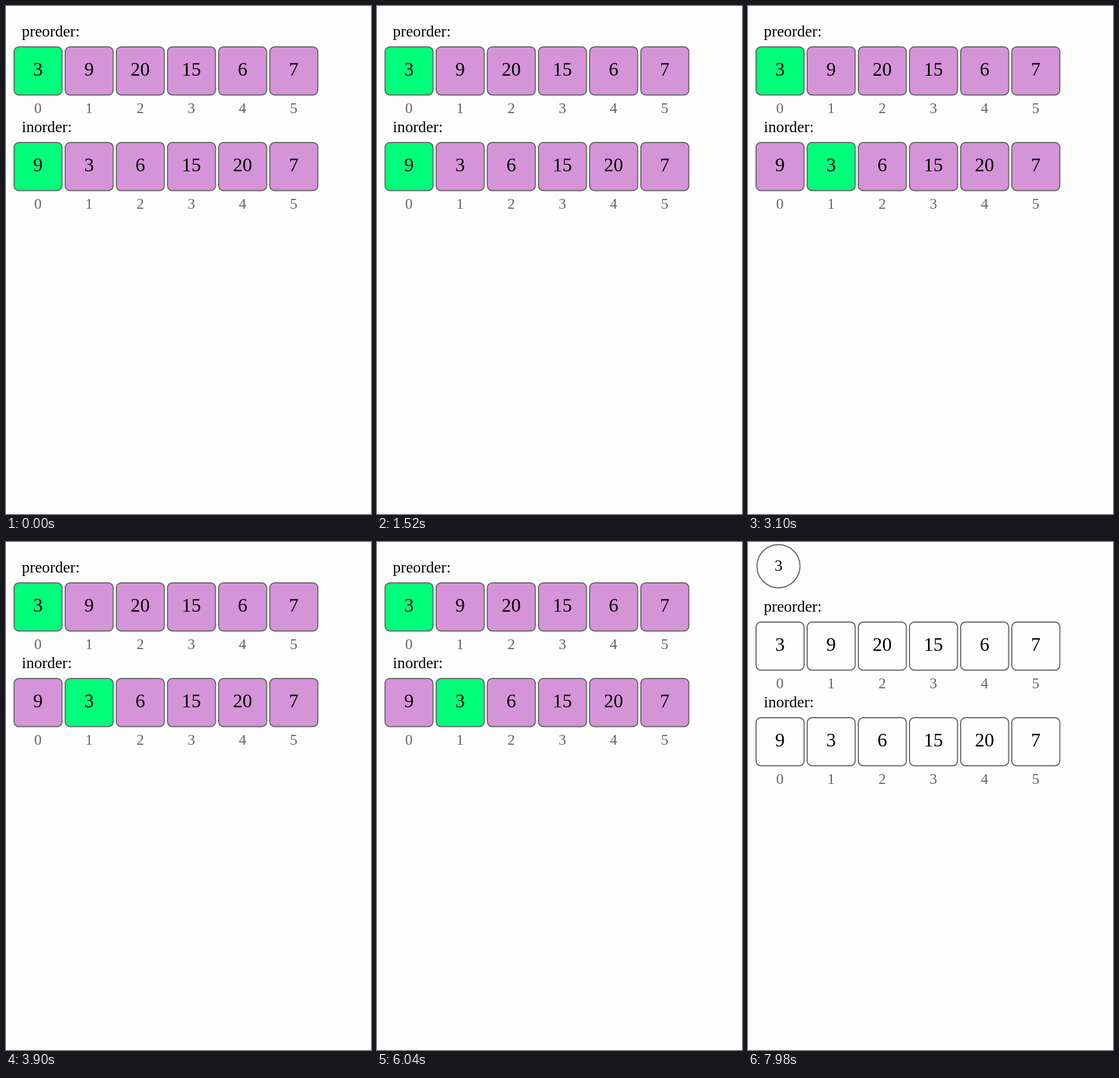
These frames come from a looping animation (635 px wide and 882 px high, 8 s). An HTML page with a canvas:

```html
<!DOCTYPE html>
<html lang="en">
<head>
<meta charset="utf-8">
<title>Preorder and inorder arrays</title>
<style>
  html, body { margin: 0; width: 100%; height: 100%; overflow: hidden; background: #fdfdfd; }
  canvas { display: block; }
</style>
</head>
<body>
<canvas id="stage" width="635" height="882"></canvas>
<script>
const ctx = document.getElementById("stage").getContext("2d");
const LOOP = 8000;
const FONT = '"Liberation Serif", "Times New Roman", serif';
const PAPER = "#fdfdfd", PLUM = "#d594d7", GREEN = "#00ff7b", GRAY = "#666";
const PITCH = 89, ROW_GAP = 166, TREE_HEIGHT = 68;

const rows = [
  { label: "preorder:", values: [3, 9, 20, 15, 6, 7] },
  { label: "inorder:", values: [9, 3, 6, 15, 20, 7] }
];

// Each state lasts until the next one begins.
const states = [
  { start: 0, active: [0, 0] },
  { start: 2800, active: [0, 1] },
  { start: 6320, node: 3 }
];

function text(str, x, y, size, color, align = "center") {
  ctx.font = `${size}px ${FONT}`;
  ctx.textAlign = align;
  ctx.fillStyle = color;
  ctx.fillText(str, x, y);
}

function outline(fill) {
  ctx.fillStyle = fill;
  ctx.fill();
  ctx.strokeStyle = GRAY;
  ctx.lineWidth = 1.9;
  ctx.stroke();
}

function drawRow({ label, values }, top, active) {
  text(label, 27.5, top + 53, 27.5, "#000", "left");
  values.forEach((value, i) => {
    const x = 14 + i * PITCH, mid = x + 41.5;
    const fill = active === undefined ? PAPER : i === active ? GREEN : PLUM;
    ctx.beginPath();
    ctx.roundRect(x, top + 71, 83.5, 83.5, 8.5);
    outline(fill);
    text(value, mid, top + 120.5, 33.3, "#000");
    text(i, mid, top + 186, 26, GRAY);
  });
}

function drawNode(value) {
  ctx.beginPath();
  ctx.arc(53, 42, 37.5, 0, Math.PI * 2);
  outline(PAPER);
  text(value, 53, 50, 27.5, "#000");
}

function draw(time) {
  const state = states.findLast(s => time >= s.start);
  const top = state.node ? TREE_HEIGHT : 0;
  ctx.fillStyle = PAPER;
  ctx.fillRect(0, 0, 635, 882);
  if (state.node) drawNode(state.node);
  rows.forEach((row, i) => drawRow(row, top + i * ROW_GAP, state.active?.[i]));
}

const origin = performance.now();
function tick() {
  draw((performance.now() - origin) % LOOP);
  requestAnimationFrame(tick);
}
tick();
</script>
</body>
</html>
```
